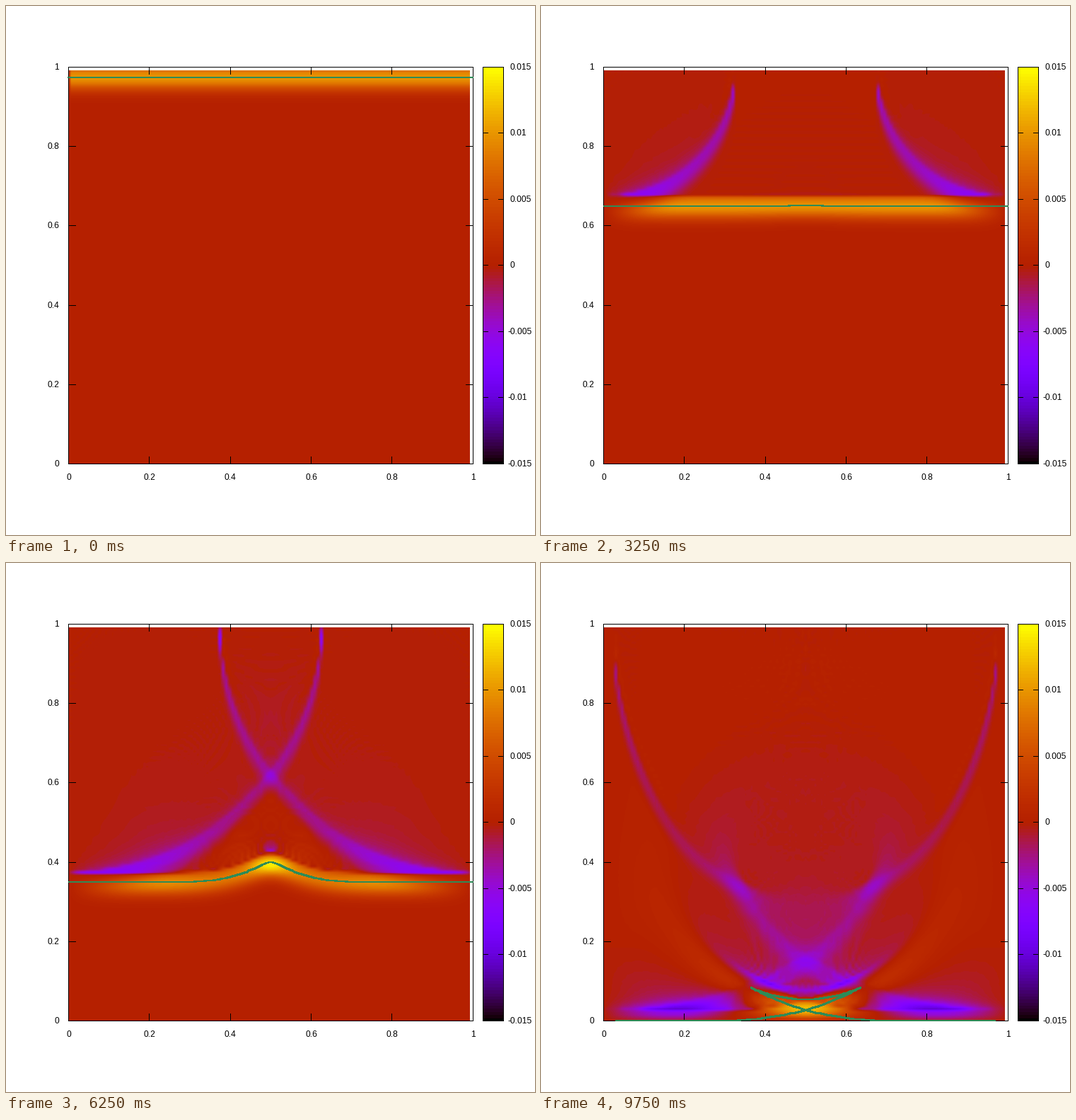
A matplotlib script that plays this animation: 748 px wide and 748 px high, repeating every 10 s.

```python
import numpy as np
import matplotlib.pyplot as plt
from matplotlib.animation import FuncAnimation
from matplotlib.colors import ListedColormap

SIZE, DPI = 748, 88
PX = 72 / DPI                       # one pixel in points
FRAMES, INTERVAL = 40, 250

LEFT, WIDTH = 88.5, 571.6           # plot box in pixels, y upwards
BOTTOM, HEIGHT = 100.5, 561.0
BAR_LEFT, BAR_RIGHT = 674.5, 703.5
VMAX, LEVELS = 0.015, 128

SHOWN, FINE = 128, 5                # plotted cells, solver cells in each
N = SHOWN * FINE
STEPS, DT = N // FRAMES, 1 / N      # steps per frame, time step
START, SHARPNESS, AMPLITUDE = 0.975, 900, 0.01
RAY_STEPS = 5


def px(x):
    return LEFT + WIDTH * x


def py(y):
    return BOTTOM + HEIGHT * y


def centre(p):
    return np.floor(p) + 0.5


def palette():
    """Black, violet, red, yellow ramp in discrete levels."""
    k = np.arange(LEVELS) / (LEVELS - 1)
    blue = np.clip(np.sin(2 * np.pi * k), 0, 1)
    return ListedColormap(np.column_stack([np.sqrt(k), k ** 3, blue]))


# --- physics: a slow round lens in the middle of the unit square ---

def speed(x, y):
    return 1 - 0.25 * np.exp(-100 * ((x - 0.5) ** 2 + (y - 0.5) ** 2))


def pulse(y):
    return AMPLITUDE * np.exp(-SHARPNESS * (y - START) ** 2)


def fix_edges(u):
    u[0] = u[-1] = 0
    u[:, 0] = u[:, -1] = 0
    return u


def wave_fields():
    """Nine-point leapfrog with fixed edges; exact along the axes where speed is 1."""
    grid = np.arange(N + 1) / N
    x, y = np.meshgrid(grid, grid)
    c2 = speed(x, y)[1:-1, 1:-1] ** 2
    prev, u = fix_edges(pulse(y - DT)), fix_edges(pulse(y))
    fields = []
    for _ in range(FRAMES):
        fields.append(u[:-1:FINE, :-1:FINE].copy())
        for _ in range(STEPS):
            rows = u[1:-1]
            dyy = u[2:] + u[:-2] - 2 * rows
            w = rows + dyy / 4
            lap = w[:, 2:] + w[:, :-2] - 2 * w[:, 1:-1] + dyy[:, 1:-1]
            # the oldest field is overwritten by the newest
            prev[1:-1, 1:-1] = 2 * rows[:, 1:-1] - prev[1:-1, 1:-1] + c2 * lap
            prev, u = u, prev
    return fields


def ray_slope(s):
    x, y, p, q = s
    c = speed(x, y)
    norm = np.hypot(p, q)
    pull = -norm * 200 * (1 - c)
    return np.array([c * p / norm, c * q / norm, pull * (x - 0.5), pull * (y - 0.5)])


def ray_fronts():
    """Rays sent straight down, joined into one front per frame."""
    x = np.linspace(0, 1, 257)
    s = np.array([x, np.full_like(x, START), 0 * x, 0 * x - 1])
    h = 1 / (FRAMES * RAY_STEPS)
    fronts = []
    for _ in range(FRAMES):
        y = np.where(s[1] > 1e-11, s[1], np.nan)
        fronts.append((np.round(px(s[0])), np.round(py(y))))
        for _ in range(RAY_STEPS):
            a = ray_slope(s)
            b = ray_slope(s + h / 2 * a)
            c = ray_slope(s + h / 2 * b)
            d = ray_slope(s + h * c)
            s = s + h / 6 * (a + 2 * b + 2 * c + d)
    return fronts


# --- drawing, in pixel coordinates ---

fig = plt.figure(figsize=(SIZE / DPI, SIZE / DPI), dpi=DPI, facecolor="white")
ax = fig.add_axes([0, 0, 1, 1])
ax.axis("off")


def stroke(xs, ys):
    ax.plot(centre(np.array(xs)), centre(np.array(ys)), color="black", lw=PX,
            antialiased=False, snap=False, zorder=3,
            solid_capstyle="projecting", solid_joinstyle="miter")


def box(x0, x1):
    y0, y1 = py(0), py(1)
    stroke([x0, x1, x1, x0, x0], [y1, y1, y0, y0, y1])


def label(x, y, text, ha):
    ax.text(x, y, text, ha=ha, va="baseline", fontsize=12 * PX,
            family="Liberation Sans", color="black")


fields, fronts = wave_fields(), ray_fronts()
colours = palette()
last, half = (SHOWN - 1) / SHOWN, 0.5 / SHOWN
nudge = 2e-6                        # keeps rounding noise in the level of zero
image = ax.imshow(fields[0], origin="lower", cmap=colours, zorder=1,
                  vmin=-VMAX - nudge, vmax=VMAX - nudge,
                  interpolation="bilinear", interpolation_stage="data",
                  extent=(px(-half), px(last + half), py(-half), py(last + half)))
image.set_clip_path(plt.Rectangle((px(0), py(0)), px(last) - px(0), py(last) - py(0),
                                  transform=ax.transData))
ax.imshow(np.arange(LEVELS)[:, None], origin="lower", cmap=colours, zorder=1,
          interpolation="nearest", extent=(BAR_LEFT, BAR_RIGHT, py(0), py(1)))

box(px(0), px(1))
for i in range(6):
    v = i / 5
    x, y = px(v), py(v)
    stroke([x, x], [py(0), py(0) + 10])
    stroke([x, x], [py(1), py(1) - 10])
    stroke([px(0), px(0) + 10], [y, y])
    stroke([px(1) - 10, px(1)], [y, y])
    label(x, 78, f"{v:g}", "center")
    label(75, centre(y) - 3.5, f"{v:g}", "right")

box(BAR_LEFT, BAR_RIGHT)
for i in range(-3, 4):
    y = py((i + 3) / 6)
    stroke([BAR_LEFT, BAR_LEFT + 7], [y, y])
    stroke([BAR_RIGHT - 7, BAR_RIGHT], [y, y])
    label(710 if i < 0 else 713, centre(y) - 3.5, f"{i * 0.005:g}", "left")

front, = ax.plot([], [], color="#2e8b57", lw=2 * PX, antialiased=False,
                 snap=False, zorder=4)
ax.set_aspect("auto")
ax.set_xlim(0, SIZE)
ax.set_ylim(0, SIZE)


def draw(i):
    image.set_data(fields[i])
    front.set_data(*fronts[i])
    return image, front


anim = FuncAnimation(fig, draw, frames=FRAMES, interval=INTERVAL,
                     init_func=lambda: draw(0), repeat=True, repeat_delay=0)
plt.show()
```
